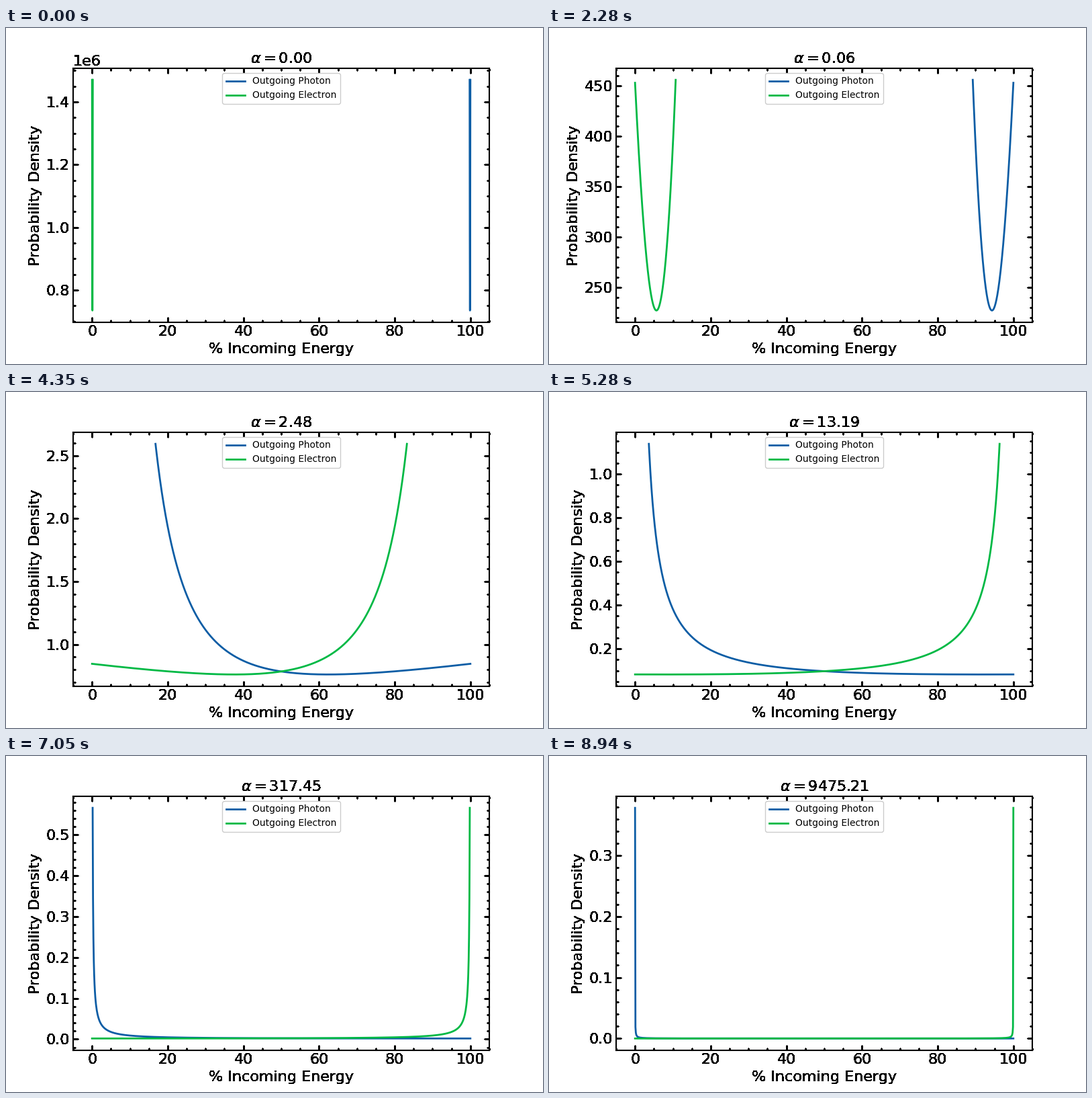
A matplotlib script that plays this animation: 800 px wide and 500 px high, repeating every 8.97 s.

```python
import numpy as np
import matplotlib.pyplot as plt
from matplotlib.animation import FuncAnimation

FRAMES = 299
INTERVAL = 30
REST_ENERGY = 0.511  # electron, MeV
BLUE, GREEN = "#0C5DA5", "#00B945"

plt.rcParams.update({
    "font.family": "DejaVu Sans",
    "mathtext.fontset": "dejavusans",
    "axes.linewidth": 1.5,
    "axes.labelsize": 16,
    "axes.titlesize": 16,
    "lines.linewidth": 2,
})
for side in ("xtick", "ytick"):
    plt.rcParams.update({
        f"{side}.direction": "in",
        f"{side}.labelsize": 16,
        f"{side}.major.size": 6,
        f"{side}.minor.size": 3,
        f"{side}.major.width": 1,
        f"{side}.minor.width": 1,
        f"{side}.minor.visible": True,
    })
plt.rcParams.update({"xtick.top": True, "ytick.right": True})


def cross_section(a):
    """Total Klein-Nishina cross section in units of pi r_e^2."""
    b = 1 + 2 * a
    log = np.log(b)
    return 2 * ((1 + a) / a**2 * (2 * (1 + a) / b - log / a)
                + log / (2 * a) - (1 + 3 * a) / b**2)


def spectrum(a, n=1000):
    """Electron energy fraction and its probability density per MeV."""
    s = np.linspace(0, 2 * a / (1 + 2 * a), n)
    r = s / (1 - s)
    shape = 2 + (r / a)**2 + r * (s - 2 / a)
    return s, shape / (REST_ENERGY * a**2 * cross_section(a))


def harden(img, dpi):
    """Turn soft glyph edges into solid black pixels."""
    out = np.zeros(img.shape, np.uint8)
    out[..., 3] = (img[..., 3] > 0.12) * np.uint8(255)
    return out, 0, 0


fig, ax = plt.subplots(figsize=(8, 5), dpi=100)
fig.subplots_adjust(left=0.125, right=0.9, bottom=0.125, top=0.88)
photon, = ax.plot([], [], color=BLUE, label="Outgoing Photon")
electron, = ax.plot([], [], color=GREEN, label="Outgoing Electron")
ax.set_xlabel("% Incoming Energy")
ax.set_ylabel("Probability Density")
title = ax.set_title("", y=1.0)
ax.legend(loc="upper center", fontsize=10, framealpha=1)
for artist in (ax.xaxis, ax.yaxis, title):
    artist.set_agg_filter(harden)


def update(i):
    a = 10 ** (-3 + 7 * i / FRAMES)
    s, density = spectrum(a)
    photon.set_data(100 * (1 - s), density)
    electron.set_data(100 * s, density)
    title.set_text(rf"$\alpha={a:.2f}$")
    ax.relim()
    ax.autoscale_view()
    return photon, electron, title


anim = FuncAnimation(fig, update, frames=FRAMES, interval=INTERVAL,
                     init_func=lambda: update(0), repeat=True)
plt.show()
```
